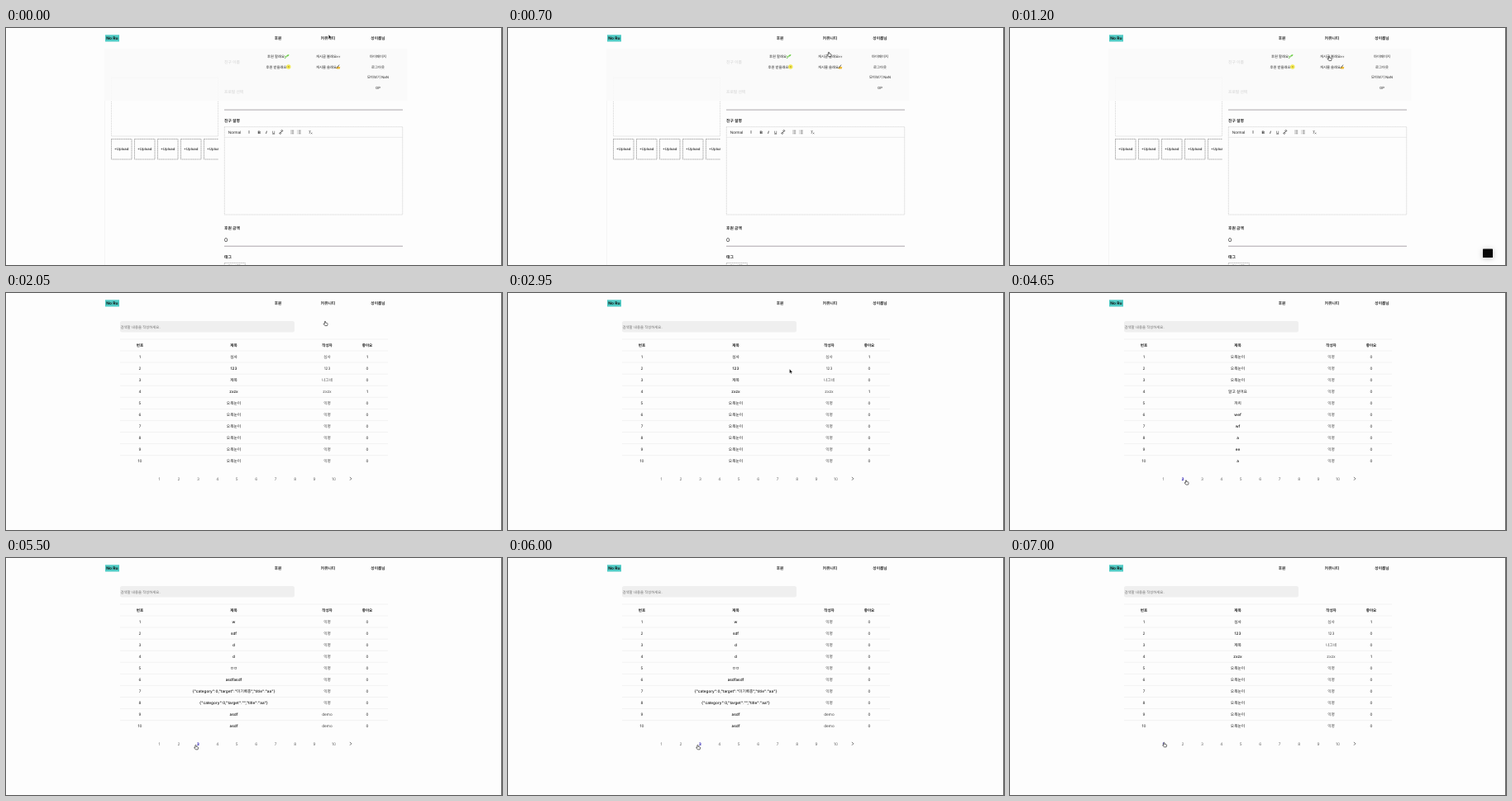
An HTML page for the animation above (7050 ms loop, 600 px wide and 287 px high).

```html
<!DOCTYPE html>
<html lang="ko">
<head>
<meta charset="utf-8">
<style>
html, body { margin: 0; width: 100%; height: 100%; overflow: hidden; background: #fdfdfd; }
svg { display: block; width: 600px; height: 287px; text-rendering: geometricPrecision; }
text { font-family: Inter, "Noto Sans CJK KR", "Noto Sans CJK", sans-serif; white-space: pre; }
#badge { filter: drop-shadow(0 1px 3px rgba(0, 0, 0, .25)); }
</style>
</head>
<body>
<svg id="stage" viewBox="0 0 600 287"></svg>
<script>
const LOOP = 7050;
const stage = document.getElementById('stage');

function add(parent, tag, attrs, content) {
  const el = document.createElementNS('http://www.w3.org/2000/svg', tag);
  for (const key in attrs) el.setAttribute(key, attrs[key]);
  if (content !== undefined) el.textContent = content;
  parent.appendChild(el);
  return el;
}
const group = (parent = stage) => add(parent, 'g', {});
const rect = (parent, x, y, width, height, fill, more) =>
  add(parent, 'rect', { x, y, width, height, fill, ...more });
const path = (parent, d, stroke, width = 0.6, fill = 'none') =>
  add(parent, 'path', { d, stroke, 'stroke-width': width, fill });
// y is the vertical middle of the line
function label(parent, str, x, y, { size = 4.7, weight = 400, fill = '#222', anchor = 'middle', ...more } = {}) {
  return add(parent, 'text', {
    x, y: y + size * 0.36, 'font-size': size, 'font-weight': weight, fill, 'text-anchor': anchor, ...more
  }, str);
}
const show = (el, on) => el.setAttribute('visibility', on ? 'visible' : 'hidden');

// Form page with the open menu
const form = group();
const border = (stroke, dash) => ({ stroke, 'stroke-width': 0.6, 'stroke-dasharray': dash });
const left = { anchor: 'start' };
const heading = { ...left, weight: 700, size: 4.8 };

path(form, 'M119.5 88V287', '#f0f0f0');
rect(form, 127.5, 60, 129, 71, 'none', border('#bbb', '1 1'));
const clip = add(form, 'clipPath', { id: 'strip' });
rect(clip, 120, 130, 137, 34, '#000');
const uploads = add(form, 'g', { 'clip-path': 'url(#strip)' });
for (let i = 0; i < 5; i++) {
  const x = 127.5 + 28 * i;
  rect(uploads, x, 134.5, 24.5, 24.5, 'none', border('#777', '1.6 .6'));
  label(uploads, '+Upload', x + 12.2, 146.8, { size: 4.3, weight: 500 });
}
label(form, '친구 이름', 264, 41, heading);
label(form, '프로필 선택', 264, 77, heading);
label(form, '친구 설명', 264, 112.6, heading);
label(form, '후원 금액', 264, 241.8, heading);
label(form, '태그', 264, 277.7, heading);
label(form, '0', 264, 256.8, { ...left, size: 6.6 });
path(form, 'M264 99.1H480M264 264.2H480', '#979097', 0.8);
rect(form, 264.3, 119.7, 215.4, 106.3, 'none', border('#bbb', '1.2 .8'));
path(form, 'M264 132.4H480', '#ddd');
rect(form, 264.3, 284.5, 25, 10, 'none', border('#999', '1.6 .6'));
label(form, '태그 선택', 267, 288, { ...left, size: 4.2 });

const tool = (str, x, style) =>
  label(form, str, x, 126, { size: 4.8, style: 'font-family: "Liberation Sans", sans-serif;' + (style || '') });
tool('Normal', 276.5, 'font-weight: 500');
tool('B', 306.2, 'font-weight: 700');
tool('I', 315, 'font-style: italic; font-weight: 700');
tool('U', 323.7);
tool('T', 367.3, 'font-style: italic');
path(form, 'M322.2 128.4h3', '#333', 0.5);
path(form, 'M293.2 125.5l.8-1.5.8 1.5zM293.2 126.5l.8 1.5.8-1.5z', 'none', 0, '#333');
path(form, 'M331.9 126.9l1.8-1.8M332.6 124.6l.8-.8q1.1-.4 1.3.9l-1 1M333.1 127.4l-.8.8q-1.2.3-1.4-.9l1-1', '#222', 0.8);
for (const x of [344, 352.5])
  path(form, `M${x + 1.4} 124.2h2.8m-2.8 1.8h2.8m-2.8 1.8h2.8M${x} 124.2h.6m-.6 1.8h.6m-.6 1.8h.6`, '#444', 0.6);
path(form, 'M368.8 126.7l1.6 1.6m0-1.6l-1.6 1.6', '#333', 0.5);

rect(form, 118.5, 25, 367, 63, '#fafafa', { 'fill-opacity': 0.88 });
const item = (str, x, y, more) => label(form, str, x, y, { size: 4.3, ...more });
item('후원 할래요', 316, 34.6, left);
item('후원 받을래요', 314.5, 47, left);
item('게시글 볼래요', 375, 34.6, left);
item('게시물 쓸래요', 375, 47, left);
['마이페이지', '로그아웃', '모아보기 NaN', 'GP'].forEach((str, i) => item(str, 450, 34.6 + 12.5 * i));
// Small pictograms after the menu items
path(form, 'M337 37q2-1 2.6-3.4', '#55b13a', 0.8);
path(form, 'M339.2 34.6q.2-2.6 3.2-2.6q0 2.6-3.2 2.6M338.8 35.6q-2 0-2-2q1.8 0 2 2', 'none', 0, '#6fd04a');
add(form, 'circle', { cx: 341.8, cy: 47, r: 2.7, fill: '#f1ea58' });
add(form, 'circle', { cx: 341.8, cy: 47, r: 1.1, fill: '#c9b02a' });
for (const x of [400.8, 403.3]) {
  add(form, 'ellipse', { cx: x, cy: 34.6, rx: 1, ry: 1.6, fill: '#fff', stroke: '#bbb', 'stroke-width': 0.25 });
  add(form, 'circle', { cx: x - 0.2, cy: 34.8, r: 0.65, fill: '#222' });
}
path(form, 'M399.3 48.6l2-2.2 3 .8-.6 2.2h-3.6z', 'none', 0, '#ecba38');
path(form, 'M399.8 48.8l3.2-4.2', '#444', 0.8);

const badge = rect(stage, 572, 267.5, 12, 10.5, '#080808', { id: 'badge', rx: 0.6 });

// Board page
const board = group();
rect(board, 138, 34, 211, 13.5, '#efefef', { rx: 2.5 });
label(board, '검색할 내용을 작성하세요.', 138.5, 41, { ...left, size: 4.4, fill: '#6c6c6c' });

const columns = [162, 275.5, 388.5, 437];
const rowY = i => 63 + 14.06 * i;
['번호', '제목', '작성자', '좋아요'].forEach((str, i) =>
  label(board, str, columns[i], rowY(0), { weight: 700, size: 4.6 }));
for (let i = 0; i <= 10; i++) path(board, `M138 ${rowY(i) - 7}H462`, '#e6e6e6', 0.5);

const repeat = (str, n) => Array(n).fill(str);
const pages = [
  {
    titles: ['심사', '123', '제목', 'zxzx', ...repeat('오목눈이', 6)],
    authors: ['심사', '123', '나그네', 'zxzx', ...repeat('익명', 6)],
    likes: [1, 0, 0, 1, ...repeat(0, 6)]
  },
  {
    titles: [...repeat('오목눈이', 3), '알고 싶어요', '까치', 'wef', 'wf', 'a', 'ee', 'a'],
    authors: repeat('익명', 10),
    likes: repeat(0, 10)
  },
  {
    titles: ['w', 'sdf', 'd', 'd', 'ㅁㅁ', 'asdfasdf',
      '{"category":0,"target":"미기록종","title":"aa"}', '{"category":0,"target":"","title":"aa"}', 'asdf', 'asdf'],
    authors: [...repeat('익명', 8), 'demo', 'demo'],
    likes: repeat(0, 10)
  }
].map(({ titles, authors, likes }) => {
  const g = group(board);
  titles.forEach((title, i) => {
    const y = rowY(i + 1);
    label(g, i + 1, columns[0], y);
    label(g, title, columns[1], y, { weight: 500, fill: '#111' });
    label(g, authors[i], columns[2], y, { fill: '#444' });
    label(g, likes[i], columns[3], y);
  });
  return g;
});

const links = Array.from({ length: 10 }, (_, i) =>
  label(board, i + 1, 185.5 + 23.45 * i, 224.8, { fill: '#666', size: 4.8 }));
path(board, 'M416 222.9l1.9 1.9-1.9 1.9', '#333', 0.7);

// Header and window edge
rect(stage, 120, 8.3, 17, 8.2, '#50cbc5');
label(stage, 'No Ru', 128.4, 12.4, { weight: 700, size: 4.9, fill: '#111' });
[['후원', 329], ['커뮤니티', 389.5], ['성이름님', 450]].forEach(([str, x]) =>
  label(stage, str, x, 12.3, { weight: 700, size: 4.7 }));
rect(stage, 599, 0, 1, 287, '#666');

// Pointer shapes, tip at the origin
const pointer = group();
const arrow = path(pointer, 'M0 0V5.2L1.2 4.1 2 5.9 2.9 5.5 2.1 3.8H3.7Z', '#fff', 0.4, '#000');
const hand = path(pointer,
  'M-.6.5Q0-.4.6.5V2.1L2.6 2.5Q3.3 2.8 3.1 3.6L2.6 5.6H-.2L-1.8 3.6Q-1.9 2.8-1.1 3L-.6 3.4Z', '#111', 0.6, '#fff');

// time, x, y
const track = [
  [0, 390.3, 8], [50, 390.3, 8], [550, 388, 28], [700, 388, 29], [1200, 386, 34], [2700, 386, 34],
  [3400, 231, 232], [3450, 230, 232], [3700, 211, 228.5], [4150, 213, 226.5], [4650, 213, 226.5],
  [4900, 226, 228], [5200, 229.5, 226.3], [6100, 229.5, 226.3], [6800, 186.5, 223.3], [LOOP, 186.5, 223.3]
];
const handTimes = [[700, 2700], [3900, 4700], [5000, 6150], [6650, LOOP]];
const within = (t, [from, to]) => t >= from && t < to;

function pointerAt(t) {
  const i = track.findIndex(k => k[0] > t);
  const [t0, x0, y0] = track[i - 1], [t1, x1, y1] = track[i];
  const u = (t - t0) / (t1 - t0), e = u * u * (3 - 2 * u);
  return [x0 + (x1 - x0) * e, y0 + (y1 - y0) * e];
}

function draw(now) {
  const t = now % LOOP;
  const onBoard = t >= 1450;
  form.style.display = onBoard ? 'none' : '';
  board.style.display = onBoard ? '' : 'none';
  show(badge, within(t, [1000, 1500]));

  const current = within(t, [4200, 5350]) ? 1 : within(t, [5350, 6850]) ? 2 : 0;
  pages.forEach((page, i) => { page.style.display = i === current ? '' : 'none'; });
  links.forEach((link, i) => {
    const active = t >= 4200 && i === current;
    link.setAttribute('fill', active ? '#1a0dab' : '#666');
    link.setAttribute('font-weight', active ? 700 : 400);
  });

  const isHand = handTimes.some(span => within(t, span));
  show(hand, isHand);
  show(arrow, !isHand);
  pointer.setAttribute('transform', `translate(${pointerAt(t)})`);
}

const start = performance.now();
function tick() {
  draw(performance.now() - start);
  requestAnimationFrame(tick);
}
tick();
</script>
</body>
</html>
```
